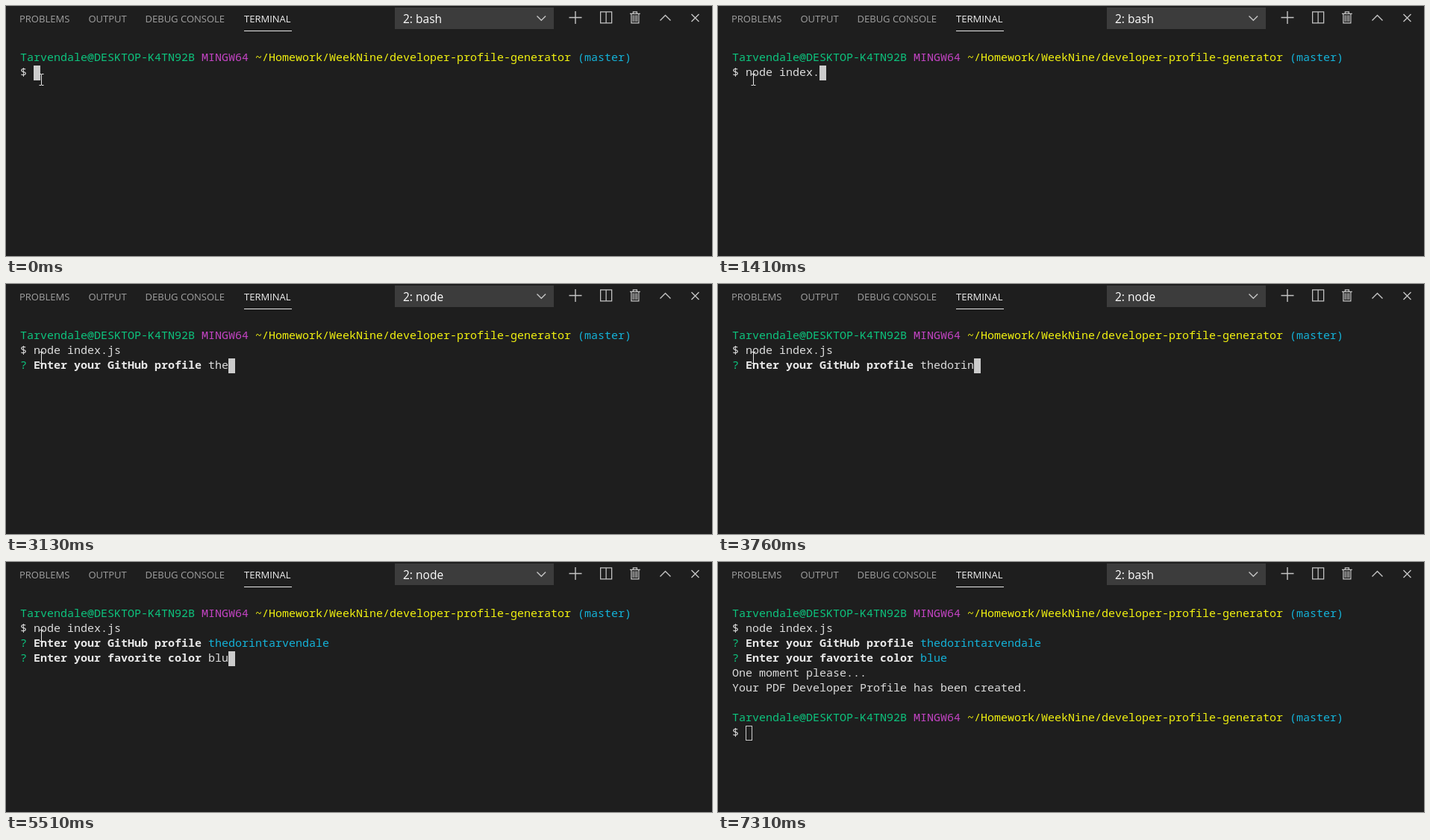
An HTML page for the animation above (7400 ms loop, 946 by 336 pixels).

```html
<!DOCTYPE html>
<html lang="en">
<head>
<meta charset="utf-8">
<title>Terminal</title>
<style>
  html, body { margin: 0; width: 100%; height: 100%; overflow: hidden; background: #1e1e1e; }
  svg { display: block; width: 946px; height: 336px; }
  text { white-space: pre; }
  .ui { font: 13px "Open Sans", sans-serif; fill: #a0a0a0; }
  .ui .active { fill: #f0f0f0; }
  .ui .pick { font-size: 15.5px; fill: #fff; }
  .icons { fill: none; stroke: #c5c5c5; stroke-width: 1.4; }
  .icons g { stroke-width: 1; }
  .term { font: 500 15px "Noto Sans Mono", monospace; fill: #dcdcdc; }
  .term .bold { font-weight: 700; fill: #e8e8e8; }
  .green { fill: #0dc47e; }
  .magenta { fill: #c444c4; }
  .yellow { fill: #f2f210; }
  .cyan { fill: #14b2d8; }
</style>
</head>
<body>
<svg viewBox="0 0 946 336">
  <g class="ui">
    <text x="18" y="22">PROBLEMS</text>
    <text x="110.5" y="22">OUTPUT</text>
    <text x="186.5" y="22">DEBUG CONSOLE</text>
    <text class="active" x="319" y="22">TERMINAL</text>
    <rect x="319" y="33" width="64" height="1" fill="#e7e7e7"/>
    <rect x="521" y="2" width="213" height="29" fill="#3c3c3c"/>
    <text class="pick" id="shell" x="532" y="23"></text>
  </g>

  <g class="icons">
    <path d="M711.5 13.5l5.8 5.8 5.8-5.8"/>
    <path d="M754.5 15.5h17M763 7v17"/>
    <g transform="translate(793.5 6) scale(1.25)">
      <path d="M2.5 1.5h12v12h-12zM8.5 1.5v12"/>
    </g>
    <g transform="translate(833.5 6) scale(1.25)">
      <path d="M2 3.5h11M5.5 3.5v-2h4v2M3.5 3.5v10h8v-10M5.5 5v7M7.5 5v7M9.5 5v7"/>
    </g>
    <path d="M876.5 19.5l7-7 7 7"/>
    <path d="M918.5 11l10 10M928.5 11l-10 10"/>
  </g>

  <g class="term">
    <g id="prompt">
      <text x="19" y="74"><tspan class="green">Tarvendale@DESKTOP-K4TN92B</tspan> <tspan class="magenta">MINGW64</tspan> <tspan class="yellow">~/Homework/WeekNine/developer-profile-generator</tspan> <tspan class="cyan">(master)</tspan></text>
      <text x="19" y="94">$</text>
    </g>
    <text id="command" x="37" y="94"></text>
    <g data-from="2340">
      <text x="19" y="114"><tspan class="green">?</tspan> <tspan class="bold">Enter your GitHub profile</tspan></text>
      <text id="profile" x="271" y="114"></text>
    </g>
    <g data-from="4910">
      <text x="19" y="134"><tspan class="green">?</tspan> <tspan class="bold">Enter your favorite color</tspan></text>
      <text id="color" x="271" y="134"></text>
    </g>
    <text data-from="5800" x="19" y="154">One moment please...</text>
    <text data-from="6520" x="19" y="174">Your PDF Developer Profile has been created.</text>
    <use data-from="6720" href="#prompt" y="140"/>
  </g>

  <rect id="caret" x=".5" y=".5" width="8" height="19" stroke="#ccc"/>
  <path id="mouse" d="M-3 -7.5h2.5l.5 .5 .5 -.5h2.5M-3 7.5h2.5l.5 -.5 .5 .5h2.5M0 -7v14" fill="none" stroke="#e8e8e8"/>
</svg>

<script>
const LOOP = 7400;
const $ = id => document.getElementById(id);
const timed = [...document.querySelectorAll('[data-from]')];

// Each input: text, time of every keystroke, time of Enter
const inputs = {
  command: {
    text: 'node index.js',
    keys: [80, 190, 300, 410, 520, 520, 640, 750, 860, 1160, 1410, 1790, 1870],
    enter: 2100
  },
  profile: {
    text: 'thedorintarvendale',
    keys: [2890, 3010, 3130, 3240, 3350, 3460, 3570, 3680, 3790, 3910,
           4060, 4160, 4270, 4370, 4470, 4570, 4670, 4770],
    enter: 4910
  },
  color: { text: 'blue', keys: [5200, 5360, 5510, 5580], enter: 5800 }
};

// Caret stops: start time, column, row, input that pushes it along
const carets = [
  [0, 2, 1, 'command'], [2100, 0, 2], [2340, 28, 2, 'profile'],
  [4910, 28, 3, 'color'], [5800, 0, 5], [6520, 0, 6], [6720, 2, 8]
];

// Pointer stops: start time, x, y
const pointer = [[0, 47.5, 99], [6020, 330, 178], [6110, 650, 262], [6200, 807.5, 301]];

const latest = (list, t) => list.filter(item => item[0] <= t).pop();
const typed = (name, t) => inputs[name].keys.filter(k => k <= t).length;

function render(t) {
  for (const el of timed) el.style.display = t >= +el.dataset.from ? '' : 'none';

  for (const name in inputs) {
    const { text, enter } = inputs[name];
    $(name).textContent = text.slice(0, typed(name, t));
    if (name !== 'command') $(name).setAttribute('class', t >= enter ? 'cyan' : '');
  }
  $('shell').textContent = t >= 2100 && t < 6720 ? '2: node' : '2: bash';

  const [, col, row, name] = latest(carets, t);
  const x = 19 + 9 * (col + (name ? typed(name, t) : 0));
  $('caret').setAttribute('transform', `translate(${x} ${60 + 20 * row})`);
  $('caret').setAttribute('fill', t < 7310 ? '#ccc' : 'none');

  const [, mx, my] = latest(pointer, t);
  $('mouse').setAttribute('transform', `translate(${mx} ${my})`);
  $('mouse').style.display = t < 6930 ? '' : 'none';
}

const start = performance.now();
function frame(now) {
  render(Math.max(0, now - start) % LOOP);
  requestAnimationFrame(frame);
}
render(0);
requestAnimationFrame(frame);
</script>
</body>
</html>
```
